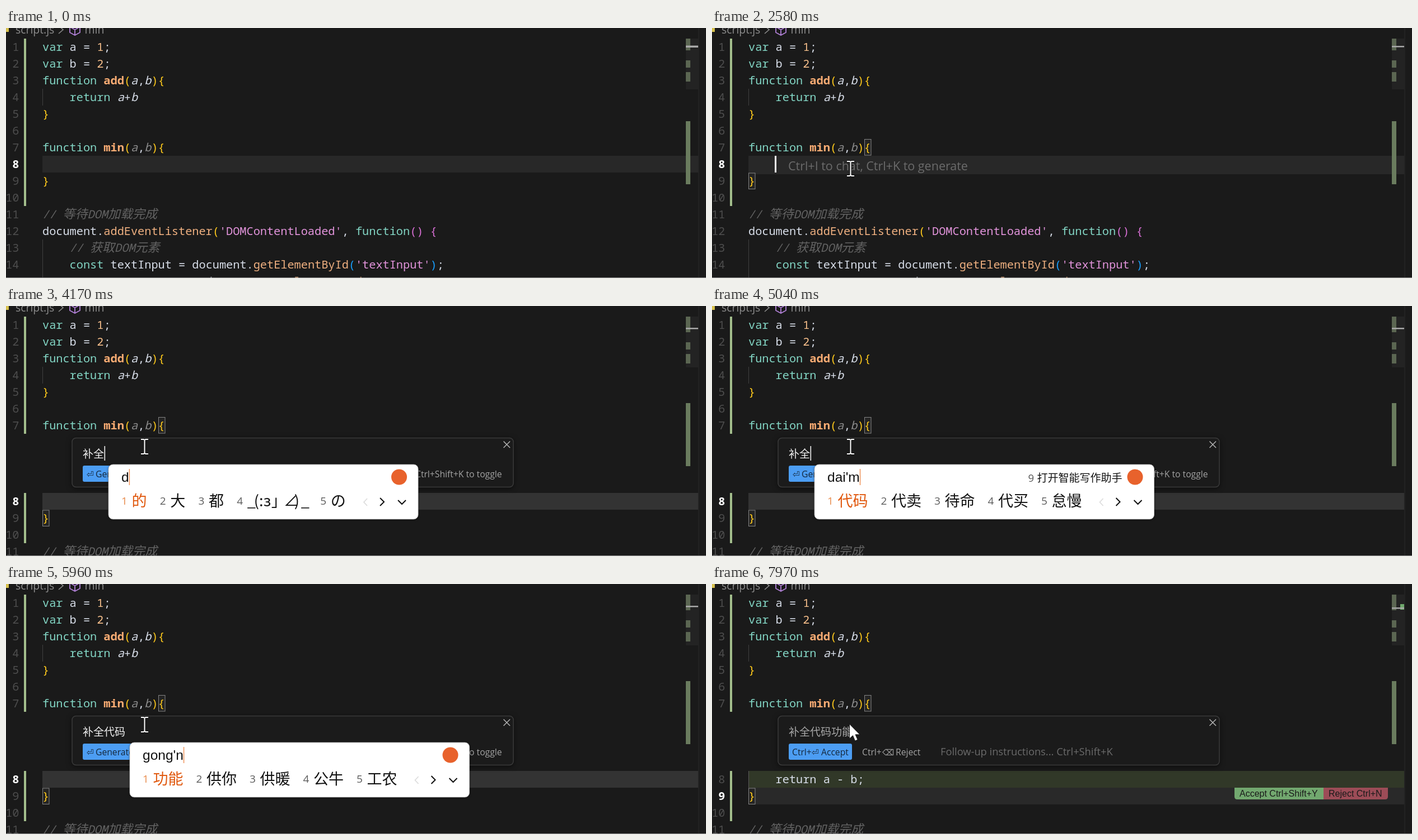
An HTML page that plays this animation: 1250x448 px, repeating every 8000 ms.

```html
<!DOCTYPE html>
<html lang="zh-CN">
<head>
<meta charset="utf-8">
<title>Editor</title>
<style>
html, body { margin: 0; width: 100%; height: 100%; overflow: hidden; background: #1a1a1a; }
svg { display: block; width: 1250px; height: 448px; }
text { white-space: pre; }
.code { font: 20.25px "Noto Sans Mono", "Noto Sans CJK SC", monospace; fill: #d8dee9; }
.ui { font-family: "Open Sans", "Noto Sans CJK SC", "Noto Sans CJK", "DejaVu Sans", sans-serif; }
.arial { font-family: "Liberation Sans", Arial, sans-serif; }
.cjk { font-family: "Noto Sans CJK SC", "Noto Sans CJK", sans-serif; }
.key { font-family: "DejaVu Sans", sans-serif; }
.kw { fill: #83d6c5; }
.fn { fill: #efb080; }
.def { fill: #fbad74; font-weight: 700; }
.num { fill: #f8c08c; }
.str { fill: #e394dc; }
.arg { font-style: italic; }
.dim { font-style: italic; fill: #8b8b8b; }
.com { font-style: italic; fill: #636363; }
.han { font-style: italic; fill: #636363; font-size: 22px; font-family: "Noto Sans CJK SC", "Noto Sans CJK", sans-serif; font-weight: 300; }
.b1 { fill: #ffca1c; }
.b2 { fill: #da70d6; }
.b3 { fill: #179fff; }
</style>
</head>
<body>
<svg id="stage" viewBox="0 0 1250 448" xmlns="http://www.w3.org/2000/svg"></svg>
<script>
const LOOP = 8000, CH = 12.15, GAP = 106;
const stage = document.getElementById('stage');

// tokens: "class:text", joined by "|"
const CODE = [
  'kw:var|: a = |num:1|:;',
  'kw:var|: b = |num:2|:;',
  'kw:function |def:add|b1:(|arg:a|:,|arg:b|b1:){',
  ':    |kw:return |arg:a|:+|arg:b',
  'b1:}',
  '',
  'kw:function |def:min|b1:(|dim:a|:,|dim:b|b1:){',
  '',
  'b1:}',
  '',
  'com:// |han:等待|com:DOM|han:加载完成',
  ":document.|fn:addEventListener|b1:(|str:'DOMContentLoaded'|:, |kw:function|b2:() {",
  'com:    // |han:获取|com:DOM|han:元素',
  ":    |kw:const|: textInput = document.|fn:getElementById|b3:(|str:'textInput'|b3:)|:;",
  ":    |kw:const|: summaryArea = document.|fn:getElementById|b3:(|str:'summaryArea'|b3:)|:;"
];

// start, left edge, typed letters, candidates
const TYPING = [
  [3440, 145, 'b', '吧 把 并 被 ∪'],
  [3590, 145, 'bu', '不 部 步 布 补'],
  [3660, 145, "bu'q", '补全 不去 不起 不清 不求'],
  [3730, 145, "bu'qu", '不去 补全 不取 不屈 补区'],
  [3800, 145, "bu'qua", '补全 不全 不权 不劝 不缺'],
  [3880, 145, "bu'quan", '补全 不全 不劝 捕犬 布泉'],
  [3950],
  [4170, 183, 'd', '的 大 都 @ の'],
  [4320, 183, 'da', '大 打 达 搭 答'],
  [4460, 183, 'dai', '带 代 待 戴 呆'],
  [4680, 183, "dai'm", '代码 代卖 待命 代买 怠慢'],
  [5260],
  [5540, 221, 'g', '个 过 跟 给 该'],
  [5620, 221, 'go', '狗 够 购 沟 构'],
  [5740, 221, 'gon', '共 供 功 公 工'],
  [5850, 221, 'gong', '共 供 功 公 工'],
  [5960, 221, "gong'n", '功能 供你 供暖 公牛 工农'],
  [6180]
];
const INPUT = [[0, ''], [3950, '补全'], [5260, '补全代码'], [6180, '补全代码功能']];
const ANSWER = [[0, ''], [7690, 'return a'], [7790, 'return a - b;']];
const EDIT_BLINK = [940, 1430, 1580, 2080, 2580, 2650];
const BOX_BLINK = [2650, 3160, 3660, 4540, 5040, 5740, 6180, 6680, 7180, 7690];
const DOTS = [[0, 1], [6680, 2], [6830, 3], [7050, 1], [7320, 2], [7530, 3]];

const at = (list, t) => list.filter(e => e[0] <= t).pop();
const isOn = (times, t) => times.filter(x => x <= t).length % 2 === 1;
const rect = (x, y, w, h, fill, more = '') =>
  `<rect x="${x}" y="${y}" width="${w}" height="${h}" fill="${fill}" ${more}/>`;
const path = (d, color, w = 1.6) => `<path d="${d}" fill="none" stroke="${color}" stroke-width="${w}"/>`;
const label = (x, y, s, size, fill, cls = 'ui', more = '') =>
  `<text class="${cls}" x="${x}" y="${y}" font-size="${size}" fill="${fill}" ${more}>${s}</text>`;
const small = (x, s, fill = '#a3a3a3') => label(x, 307, s, 15.7, fill);
const key = (x, s, fill = '#a3a3a3') => label(x, 307, s, 15, fill, 'key');

function codeLine(x, y, src) {
  const spans = src.split('|').map(tok => {
    const i = tok.indexOf(':');
    return `<tspan class="${tok.slice(0, i)}">${tok.slice(i + 1)}</tspan>`;
  });
  return `<text class="code" x="${x}" y="${y}">${spans.join('')}</text>`;
}

function header() {
  return rect(0, 0, 5, 7, '#d6c04c') +
    label(17, 10, 'script.js', 19.4, '#8d8d8d') + label(140.5, 10, 'min', 19.4, '#8d8d8d') +
    path('M94 -4 L102 3 L94 10', '#8d8d8d') +
    path('M123 -7 L132 -2 V8 L123 13 L114 8 V-2 Z M114 -2 L123 3 L132 -2 M123 3 V13', '#b180d7', 1.8);
}

function ruler(t, open, done) {
  const d = open ? 7 : 0, mark = '#5b6652';
  let s = rect(1214, 19, 22, 91, '#232323') + rect(1214, 19, 8, 21 + d, mark) +
    rect(1214, 58 + d, 8, 13, mark) + rect(1214, 79 + d, 8, 17, mark) +
    rect(1214, 167 + d, 8, 113, '#6a7c5e');
  if (done) s += rect(1229, 36, 7, 10, '#6fa86c');
  const y = done ? 42 : open ? 39 : t < 70 ? 31.5 : 32;
  s += rect(1214, y, 22, t < 70 ? 3.5 : 2.5, '#a9a9a9');
  return s + rect(1236.5, 0, 1, 448, '#2b2b2b');
}

function editor(t, open, answer, done) {
  const shift = n => n > 7 && open ? GAP : 0;
  const active = done ? 9 : 8;
  const row8 = 229 + shift(8);
  const focus = t >= 940, hint = t >= 1010 && !open;
  let s = '';
  if (answer) s += rect(65, row8, 1171, 30, '#313828');
  else s += rect(65, row8, 1171, hint ? 33 : 30, open ? '#333' : '#282828');
  if (done) s += rect(65, 365, 1171, 30, '#292929');
  s += rect(65, 109, 1, 30, '#404040');
  if (!open) s += rect(65, 379, 1, 69, '#404040');
  if (answer) s += rect(65, row8, 1, 30, '#5a5a5a');
  if (open) s += rect(32, 19, 4, 210, '#a3be8c') + rect(32, 335, 4, 90, '#a3be8c');
  else s += rect(32, 19, 4, 300, '#a3be8c');
  if (focus) {
    const box = (x, y) => rect(x, y, 11.5, 28.5, '#242424', 'stroke="#858585"');
    s += box(272.5, 199.5) + box(65.5, 260 + shift(9));
  }
  CODE.forEach((src, i) => {
    const n = i + 1, y = 41 + 30 * i + shift(n);
    if (y > 475) return;
    const hot = n === active;
    s += label(23.5, y, n, 20.25, hot ? '#fff' : '#4d4d4d', 'code',
      `text-anchor="end" style="fill:${hot ? '#fff;font-weight:600' : '#4d4d4d'}"`);
    if (src) s += codeLine(65, y, src);
  });
  if (answer) s += codeLine(65 + 4 * CH, row8 + 22, ':' + answer);
  if (hint) s += label(136, 254.5, 'Ctrl+I to chat, Ctrl+K to generate', 21.5, '#6b6b6b');
  if (!open && isOn(EDIT_BLINK, t)) s += rect(112, 229, 3, 30, '#fff');
  if (done) {
    s += '<path d="M933 365 H1092 V386 H938 Q933 386 933 381 Z" fill="#72a86f"/>' +
      '<path d="M1092 365 H1207 V381 Q1207 386 1202 386 H1092 Z" fill="#9c4c57"/>' +
      label(942, 381, 'Accept Ctrl+Shift+Y', 16, '#1a1a1a', 'arial') +
      label(1101, 381, 'Reject Ctrl+N', 16, '#1a1a1a', 'arial');
  }
  return s;
}

function dialog(t, done) {
  const text = at(INPUT, t)[1];
  let s = rect(118, 236.5, 788, 88, '#1b1b1b',
    'rx="7" stroke="#3b3b3b" stroke-width="1.5" style="filter:drop-shadow(0 2px 5px #0008)"');
  s += path('M888.5 242.5 L900 254 M900 242.5 L888.5 254', '#b4b4b4', 1.5);
  if (text) s += label(137, 272, text, 19, done ? '#a8a8a8' : '#f2f2f2', 'cjk');
  else s += label(137.5, 272, 'New code instructions... (', 18.25, '#6b6b6b') +
    label(347, 271, '⇅', 17, '#8a8a8a', 'key') +
    label(366, 272, 'for history, @ for code / documentation)', 18.25, '#6b6b6b');
  if (!done && isOn(BOX_BLINK, t)) s += rect(137.5 + 19 * text.length, 251, 1.6, 26, '#f0f0f0');

  const blue = w => rect(137, 286, w, 29, '#4c9df3', 'rx="3"'), navy = '#14273b';
  if (done) {
    return s + blue(113) + small(143, 'Ctrl+', navy) + key(178, '⏎', navy) + small(195, 'Accept', navy) +
      small(268, 'Ctrl+') + key(304, '⌫') + small(328, 'Reject') +
      label(408, 306.5, 'Follow-up instructions... Ctrl+Shift+K', 18.25, '#6b6b6b');
  }
  if (t >= 6460) {
    s += label(259, 307, 'Generating', 15.7, '#a3a3a3', 'ui', 'text-anchor="end"');
    for (let i = 0; i < at(DOTS, t)[1]; i++) s += rect(260.5 + 4 * i, 305.6, 2, 2, '#a3a3a3');
    s += small(278, 'Ctrl+') + key(314, '⌫') + small(338, 'Cancel');
  } else if (text) {
    s += blue(95) + key(144, '⏎', navy) + small(160, 'Generate', navy);
  } else {
    s += small(137.5, 'Esc to close');
  }
  return s + label(712, 306, 'tandri-2.4-rondel', 16.3, '#b5b5b5', 'arial', 'text-anchor="end"') +
    small(731, 'Ctrl+Shift+K to toggle');
}

function face(x) {
  const part = (dx, c) => `<tspan x="${x + dx}">${c}</tspan>`;
  return part(0, '_') + part(12, '(:з') + part(43, '｣') + part(65, '∠') + part(84, ')') + part(96, '_');
}

function ime(t) {
  const step = at(TYPING, t);
  if (!step || !step[1]) return '';
  const [, left, typed, list] = step;
  let x = left + 23, items = '';
  list.split(' ').forEach((word, i) => {
    const smile = word === '@';
    items += label(x, 356, i + 1, 19, i ? '#5c5c5c' : '#e88b4c') +
      label(x + 18.5, 359, smile ? face(x + 18.5) : word, 27, i ? '#111' : '#e0570c', 'cjk');
    x += smile ? 149 : 42 + 26.75 * word.length;
  });
  const right = x + 106;
  const wide = 24.5 * [...typed].reduce((w, c) => w + ({ "'": .191, i: .222, m: .833 }[c] || .556), 0);
  let s = rect(left, 284, right - left, 98, '#fff',
    'rx="8" stroke="#b9b9b9" stroke-width=".8" style="filter:drop-shadow(0 1px 2px #0006)"') + items;
  s += label(left + 23, 315, typed, 24.5, '#111', 'arial') + rect(left + 23 + wide, 292, 1.5, 29, '#f0935a');
  s += path(`M${x + 15} 345 l-6 6.5 l6 6.5`, '#dcdcdc', 1.7) +
    path(`M${x + 38} 344 l7 7 l-7 7`, '#111', 2) + path(`M${x + 70} 348 l7 7 l7 -7`, '#111', 2);
  s += `<circle cx="${right - 34}" cy="306.5" r="14" fill="#e8622c"/>`;
  if (t >= 5040 && t < 5260) {
    s += label(right - 225, 315, '9', 18.5, '#555') + label(right - 209, 315, '打开智能写作助手', 19, '#111', 'cjk');
  }
  return s;
}

function pointer(t) {
  if (t >= 7970) {
    return '<path d="M245.5 251 V277 L251.5 271.5 L255.5 281 L260 279 L256 269.8 H264 Z" fill="#fff" stroke="#111" stroke-width=".8"/>';
  }
  if (t < 70) return '';
  const p = Math.min(1, (t - 70) / 800), k = (1 - p) ** 2;
  const x = 247.5 + 180 * k, y = 252 + 215 * k;
  const beam = 'M-6.5 -13 H-2 L0 -12 L2 -13 H6.5 M0 -12 V12 M-6.5 13 H-2 L0 12 L2 13 H6.5';
  return `<g transform="translate(${x.toFixed(1)} ${y.toFixed(1)})">${path(beam, '#111', 4)}${path(beam, '#fff', 2)}</g>`;
}

let shown = '';
function draw(t) {
  const open = t >= 2650, done = t >= 7880, answer = at(ANSWER, t)[1];
  const picture = rect(0, 0, 1250, 448, '#1a1a1a') + header() + editor(t, open, answer, done) +
    ruler(t, open, done) + (open ? dialog(t, done) : '') + pointer(t) + ime(t) +
    rect(0, 447, 1250, 1, '#8a8a8a');
  if (picture !== shown) stage.innerHTML = shown = picture;
}

const start = performance.now();
function tick() {
  draw((performance.now() - start) % LOOP);
  requestAnimationFrame(tick);
}
tick();
</script>
</body>
</html>
```
